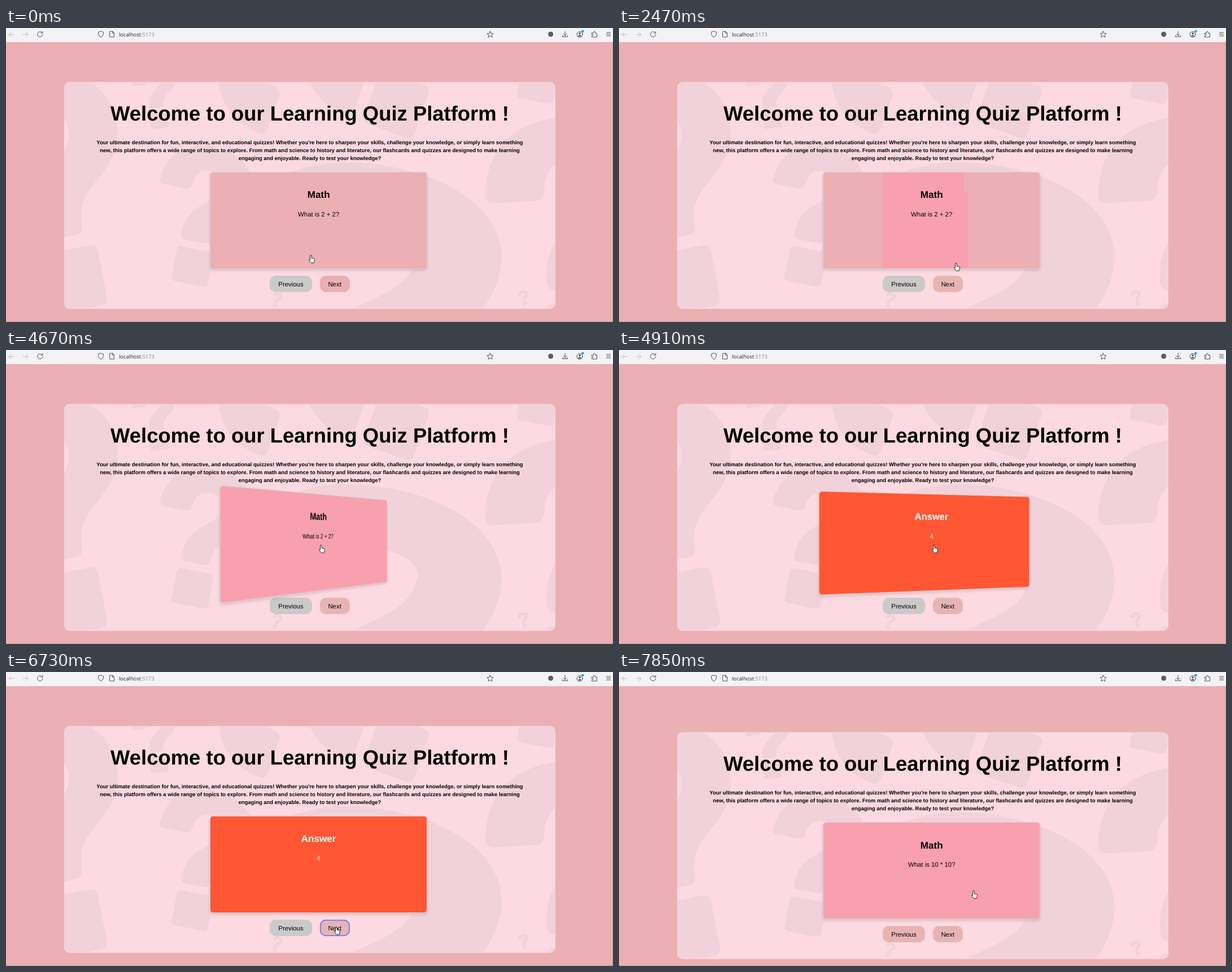
These frames come from a looping animation (1075x521 px, 8 s). An HTML page:

```html
<!DOCTYPE html>
<html lang="en">
<head>
<meta charset="utf-8">
<title>Learning Quiz Platform</title>
<style>
  html, body { margin: 0; width: 100%; height: 100%; overflow: hidden; background: #ecafb3; }
  body { position: relative; font: 11.4px "Liberation Sans", Arial, sans-serif; text-rendering: geometricPrecision; }
  svg, #page, #scene, #ghost, .card, .card div, button { position: absolute; }
  svg { left: 0; top: 0; overflow: visible; }
  #page { left: 0; top: 0; width: 1075px; height: 521px; }
  #ghost { left: 103px; top: 95.7px; width: 870px; height: 30px; border-radius: 10px 10px 0 0; background: #e6b5b3; }
  #scene { left: 361.2px; top: 255px; width: 385px; height: 171.5px; perspective: 712.5px; perspective-origin: 50% 70.5px; }
  .card { inset: 0; box-sizing: border-box; border: 1.4px solid #d5d0d0; border-radius: 5.5px;
          box-shadow: 0 2.9px 5.7px rgba(0,0,0,.13); overflow: hidden; text-align: center; }
  .card div { left: 0; right: 0; line-height: 20px; }
  .card .patch { left: 104.4px; right: auto; top: 0; width: 151px; height: 100%; background: #f9a0ae;
          clip-path: polygon(0 0, 144px 0, 144px 36px, 100% 36px, 100% 100%, 0 100%); }
  #heading { top: 30.2px; font-size: 17.1px; font-weight: bold; }
  #detail { top: 65px; }
  button { top: 439px; height: 29px; padding: 0; border: 0; border-radius: 10.7px; font: inherit; color: #000; }
  #previous { left: 467.4px; width: 74.2px; }
  #next { left: 555.6px; width: 53px; }
</style>
</head>
<body>
<div id="ghost"></div>
<div id="page">
  <svg width="1075" height="521">
    <defs>
      <clipPath id="panel"><rect x="103" y="95.7" width="870" height="402" rx="10"/></clipPath>
      <!-- Question mark with the centre of its dot at the origin -->
      <g id="mark">
        <path d="M-86 -142C-84 -190 -50 -215 -4 -215C45 -215 78 -190 77 -152C76 -95 22 -100 22 -54Q22 -45 13 -45H-22Q-30 -45 -30 -54C-32 -115 27 -115 27 -155C27 -166 16 -172 -2 -172C-18 -172 -26 -163 -28 -143Q-29 -134 -38 -134H-78Q-86 -134 -86 -142Z"/>
        <rect x="-33" y="-32" width="66" height="63" rx="7"/>
      </g>
    </defs>
    <g clip-path="url(#panel)" fill="#f2d2da">
      <path fill="#fddae1" d="M103 95H973V498H103Z"/>
      <use href="#mark" transform="translate(115 448) rotate(-11) scale(1.73)"/>
      <use href="#mark" transform="translate(271 163) rotate(-6) scale(.48)"/>
      <use href="#mark" transform="translate(330 423) rotate(11)"/>
      <use href="#mark" transform="translate(692 136) rotate(-70.5) scale(1.5)"/>
      <use href="#mark" transform="translate(552 772) scale(3 2.5) rotate(12)"/>
      <use href="#mark" transform="translate(942 99) rotate(11)"/>
      <use href="#mark" transform="translate(1017 544) rotate(-3) scale(1.8)"/>
      <use href="#mark" transform="translate(476 491) rotate(20) scale(.11)"/>
      <use href="#mark" transform="translate(919 488) rotate(-12) scale(.11)"/>
    </g>
    <g font-weight="bold" text-anchor="middle">
      <text x="538" y="163.8" font-size="36.45">Welcome to our Learning Quiz Platform !</text>
      <g font-size="9.46">
        <text x="538" y="205.7">Your ultimate destination for fun, interactive, and educational quizzes! Whether you're here to sharpen your skills, challenge your knowledge, or simply learn something</text>
        <text x="538" y="219.9">new, this platform offers a wide range of topics to explore. From math and science to history and literature, our flashcards and quizzes are designed to make learning</text>
        <text x="538" y="234.1">engaging and enjoyable. Ready to test your knowledge?</text>
      </g>
    </g>
  </svg>
  <button id="previous" tabindex="-1">Previous</button>
  <button id="next" tabindex="-1">Next</button>
  <div id="scene">
    <div class="card" id="card">
      <div class="patch" id="patch"></div>
      <div id="heading"></div>
      <div id="detail"></div>
    </div>
  </div>
</div>
<svg width="1075" height="521" fill="none" stroke="#4c4c55" stroke-linecap="round" stroke-linejoin="round">
  <path fill="#f3f3f6" stroke="none" d="M0 0H1075V25H0Z"/>
  <path stroke="#bcbcc0" d="M14 11.5H5m4-4l-4 4l4 4M30 11.5h9m-4-4l4 4l-4 4"/>
  <path d="M64 8.3A4.7 4.7 0 1 0 65 11.5M65 6v3h-3"/>
  <path d="M168 5.8l4.5 1.5q.5 6.500-4.500 9.200q-5-2.700-4.500-9.200z"/>
  <path d="M184 6h5l2.500 2.500V16H184zM188.500 6v3h3"/>
  <path d="M857.500 5.700l1.700 3.600l3.800 .5l-2.800 2.700l.8 3.800l-3.500-1.900l-3.500 1.900l.8-3.800l-2.800-2.700l3.800-.5z"/>
  <circle cx="964.700" cy="11" r="4.500" fill="#5b5b66" stroke="none"/>
  <path d="M990 6v7.500m-3-3l3 3l3-3M985.500 13.500v2h9v-2"/>
  <circle cx="1016" cy="11.500" r="5"/>
  <path fill="#4c4c55" d="M1013.500 14q2.500-2.500 5 0zM1016 8.500a1.300 1.300 0 1 0 .1 0"/>
  <circle cx="1021.300" cy="5.700" r="2.300" fill="#14a6ee" stroke="none"/>
  <path d="M1037.500 9h3V7.500a1.500 1.500 0 0 1 3 0V9h3v7h-9v-2.500h1.500a1.300 1.300 0 0 0 0-2.500h-1.500z"/>
  <path d="M1063.500 8h7m-7 3h7m-7 3h7"/>
  <text x="200" y="15.300" font-family="Open Sans, sans-serif" font-size="9.300" fill="#222" stroke="none">localhost<tspan fill="#85858c">:5173</tspan></text>
  <path stroke="#b5a0a4" d="M0 520.500H1074.500V25"/>
  <path id="cursor" fill="#fff" stroke="#222" d="M3.700 .7Q5.200 .7 5.200 2.200V5.800L9 6.700Q10.800 7.200 10.500 9L9.800 12L9 14.400H4.500L1 10Q0 8.500 1.200 8L2.700 9V2.200Q2.700 .7 3.700 .7Z"/>
</svg>
<script>
const LOOP = 8000, STEP = 120, FLIP_TIME = 500;
const BASE = '#ecafb3', PINK = '#f9a0ae', MUTED = '#e6b5b3', ORANGE = '#ff5733';
const $ = id => document.getElementById(id);

// The screen refreshes only during these bursts; each one carries the pointer to a new place.
const burst = (start, end, x, y) => ({ start, end, x, y });
const ON_CARD = [554, 345], ON_NEXT = [581, 451];
const bursts = [
  burst(0, 0, 536, 402), burst(120, 840, 500, 450), burst(1750, 2470, 593, 416),
  burst(2590, 3070, 505, 251), burst(3570, 4170, ...ON_CARD), burst(4670, 5150, ...ON_CARD),
  burst(5530, 6250, ...ON_NEXT), burst(6370, 6730, ...ON_NEXT), burst(6980, 7460, ...ON_NEXT),
  burst(7610, 7850, 624, 387)];

// Latest refresh time, with the pointer position reached by then.
function refreshAt(time) {
  const i = bursts.findLastIndex(b => b.start <= time);
  const to = bursts[i], from = bursts[Math.max(i - 1, 0)];
  const t = to.start + Math.floor((Math.min(time, to.end) - to.start) / STEP) * STEP;
  const rest = 1 - (t - to.start + STEP) / (to.end - to.start + STEP), k = 1 - rest * rest;
  return { t, x: from.x + (to.x - from.x) * k, y: from.y + (to.y - from.y) * k };
}

// CSS "ease": cubic-bezier(.25, .1, .25, 1), solved by bisection.
function ease(x) {
  if (x <= 0 || x >= 1) return x <= 0 ? 0 : 1;
  const bezier = (p, q, s) => 3 * p * s * (1 - s) ** 2 + 3 * q * s * s * (1 - s) + s ** 3;
  let low = 0, high = 1;
  for (let i = 0; i < 24; i++) {
    const mid = (low + high) / 2;
    if (bezier(.25, .25, mid) < x) low = mid; else high = mid;
  }
  return bezier(.1, 1, low);
}

function drawCard(t, second) {
  const turn = 180 * (ease((t - 4584) / FLIP_TIME) - ease((t - 6994) / FLIP_TIME));
  const back = turn > 90;
  const hovered = t >= 7730 || (t >= 4670 && !second);
  $('card').style.transform = `rotateY(${back ? 180 - turn : turn}deg)`;
  $('card').style.background = back ? ORANGE : hovered ? PINK : BASE;
  $('card').style.color = back ? '#fff' : '#000';
  $('heading').textContent = back ? 'Answer' : 'Math';
  $('detail').textContent = back ? (second ? '100' : '4') : `What is ${second ? '10 * 10' : '2 + 2'}?`;
  $('patch').style.display = t >= 2110 && t < 4670 ? 'block' : 'none';
}

function draw() {
  const { t, x, y } = refreshAt(performance.now() % LOOP), second = t >= 6980;
  $('page').style.top = second ? '11.4px' : '0';
  $('ghost').style.display = second ? 'block' : 'none';
  $('previous').style.background = second ? MUTED : '#cacaca';
  $('next').style.background = t >= 1990 ? MUTED : BASE;
  $('next').style.boxShadow = t >= 6730 && t < 7610 ? 'inset 0 0 0 1.5px #646cff' : 'none';
  drawCard(t, second);
  $('cursor').setAttribute('transform', `translate(${x} ${y})`);
  requestAnimationFrame(draw);
}
draw();
</script>
</body>
</html>
```
